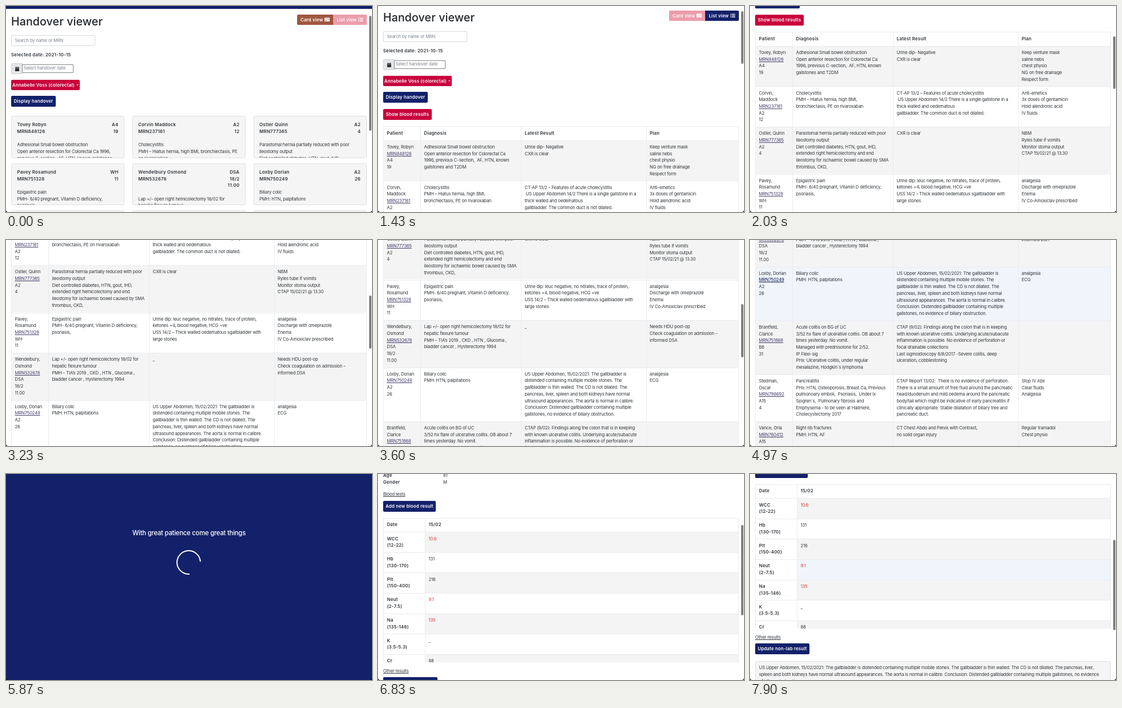
An HTML page that plays this animation: 640x360 px, repeating every 8000 ms.

```html
<!DOCTYPE html>
<html lang="en">
<head>
<meta charset="utf-8">
<title>Handover viewer</title>
<style>
html, body { margin: 0; width: 100%; height: 100%; overflow: hidden; background: #fff; }
#stage { position: relative; width: 640px; height: 360px; overflow: hidden; color: #30353a;
  font: 7.7px/11.7px Inter, "Open Sans", sans-serif; letter-spacing: -.022em; }
#stage div, p { position: absolute; box-sizing: border-box; margin: 0; }
p { white-space: pre; }
.page { left: 0; top: 0; width: 640px; height: 1400px; }
.b { font-size: 7.85px; font-weight: 600; letter-spacing: .03em; }
u { text-underline-offset: .8px; text-decoration-thickness: .6px; }
.link u { color: #453d6b; }
.title { font-size: 19.6px; line-height: 24px; font-weight: 500; letter-spacing: .005em; color: #212529; }
.hint { color: #7d858c; }
.btn { border-radius: 2px; color: #fff; font-size: 7.8px; font-weight: 600; letter-spacing: .025em;
  line-height: 18.6px; text-align: center; white-space: pre; }
.caret { display: inline-block; margin: 0 0 1.3px 3px; border: 2.3px solid transparent;
  border-top-color: #fff; border-bottom: 0; }
.card { background: #f5f5f5; border: 1px solid #e0e0e0; border-radius: 2.5px; overflow: hidden; }
.right { text-align: right; }
.line { background: #e9ebed; }
.red { color: #d9363a; }
#loader { inset: 0; background: #13216a; color: #fff; }
#loader p { left: 0; width: 640px; top: 96px; font: 500 11.3px/14px Inter, sans-serif;
  letter-spacing: -.02em; text-align: center; }
#ring { left: 298.3px; top: 132.8px; width: 43px; height: 43px; border: 2.3px solid #fff;
  border-right-color: transparent; border-radius: 50%; transform: rotate(41deg); }
#thumb { left: 635.4px; width: 3.4px; border-radius: 2px; background: #7f7f7f; }
#corners { inset: 0; border-radius: 0 0 4px 4px; box-shadow: 0 0 0 9px #000; }
</style>
</head>
<body>
<div id="stage"></div>
<script>
const NAVY = '#13216a', RED = '#c8003c', PINK = '#ec9dac', BROWN = '#a0563f';
const L = 11.7, GREY = '#f4f4f4', HOVER = '#f0f5fc';

const box = (x, y, w, h, css = '', cls = '', html = '', id = '') =>
  `<div id="${id}" class="${cls}" style="left:${x}px;top:${y}px;width:${w}px;height:${h}px;${css}">${html}</div>`;
// y is the centre of the first line
const text = (x, y, s, cls = '', css = '') =>
  `<p class="${cls}" style="left:${x}px;top:${y - L / 2}px;${css}">${s}</p>`;
const btn = (y, w, label, color = NAVY) => box(9, y, w, 18.6, 'background:' + color, 'btn', label);
const icon = (x, shape) =>
  `<svg style="position:absolute;left:${x}px;top:5.5px" width="9" height="8" fill="#fff">${shape}</svg>`;
const title = text(9, 44, 'Handover viewer', 'title');
const nav = box(0, 0, 640, 27.5, 'background:' + NAVY);

const people = [
  ['Tovey', 'Robyn', 'MRN848126', 'A4\n19'],
  ['Corvin', 'Maddock', 'MRN237161', 'A2\n12'],
  ['Ostler', 'Quinn', 'MRN777365', 'A2\n4'],
  ['Pavey', 'Rosamund', 'MRN751328', 'WH\n11'],
  ['Wendelbury', 'Osmond', 'MRN532678', 'DSA\n18/2\n11.00'],
  ['Loxby', 'Dorian', 'MRN750249', 'A2\n26'],
  ['Brantfeld', 'Clarice', 'MRN751868', 'B6\n31'],
  ['Stedman', 'Oscar', 'MRN798692', 'A15\n4'],
  ['Vance', 'Orla', 'MRN760412', 'A15\n9'],
];

const cardNotes = [
  'Adhesional Small bowel obstruction\nOpen anterior resection for Colorectal Ca 1996,\nprevious C-section,  AF, HTN, known gallstones',
  'Cholecystitis\nPMH – Hiatus hernia, high BMI, bronchiectasis, PE\non rivaroxaban',
  'Parastomal hernia partially reduced with poor\nileostomy output\nDiet controlled diabetes, HTN, gout, IHD,',
  'Epigastric pain\nPMH- 6/40 pregnant, Vitamin D deficiency,\npsoriasis,',
  'Lap +/- open right hemicolectomy 18/02 for\nhepatic flexure tumour',
  'Biliary colic\nPMH: HTN, palpitations',
  '', '', '',
];

const scan = [
  'US Upper Abdomen, 15/02/2021: The gallbladder is', 'distended containing multiple mobile stones. The',
  'gallbladder is thin walled. The CD is not dilated. The', 'pancreas, liver, spleen and both kidneys have normal',
  'ultrasound appearances. The aorta is normal in calibre.', 'Conclusion: Distended gallbladder containing multiple',
  'gallstones, no evidence of biliary obstruction.'];

const notes = [
  ['Adhesional Small bowel obstruction\nOpen anterior resection for Colorectal Ca\n1996, previous C-section,  AF, HTN, known\ngallstones and T2DM',
    'Urine dip- Negative\nCXR is clear',
    'Keep venture mask\nsaline nebs\nchest physio\nNG on free drainage\nRespect form'],
  ['Cholecystitis\nPMH – Hiatus hernia, high BMI,\nbronchiectasis, PE on rivaroxaban',
    'CT-AP 13/2 – Features of acute cholecystitis\n US Upper Abdomen 14/2 There is a single gallstone in a\nthick walled and oedematous\ngallbladder. The common duct is not dilated.',
    'Anti-emetics\n3x doses of gentamicin\nHold alendronic acid\nIV fluids'],
  ['Parastomal hernia partially reduced with poor\nileostomy output\nDiet controlled diabetes, HTN, gout, IHD,\nextended right hemicolectomy and end\nileostomy for ischaemic bowel caused by SMA\nthrombus, CKD,',
    'CXR is clear', 'NBM\nRyles tube if vomits\nMonitor stoma output\nCTAP 15/02/21 @ 13.30'],
  ['Epigastric pain\nPMH- 6/40 pregnant, Vitamin D deficiency,\npsoriasis,',
    'Urine dip: leuc negative, no nitrates, trace of protein,\nketones +4, blood negative, HCG +ve\nUSS 14/2 – Thick walled oedematous sgallbladder with\nlarge stones',
    'analgesia\nDischarge with omeprazole\nEnema\nIV Co-Amoxiclav prescribed'],
  ['Lap +/- open right hemicolectomy 18/02 for\nhepatic flexure tumour\nPMH – TIA’s 2019 , CKD , HTN , Glucoma ,\nbladder cancer , Hysterectomy 1994',
    '_', 'Needs HDU post-op\nCheck coagulation on admission –\ninformed DSA'],
  ['Biliary colic\nPMH: HTN, palpitations', scan.join('\n'), 'analgesia\nECG'],
  ['Acute colitis on BG of UC\n3/52 hx flare of ulcerative colitis. OB about 7\ntimes yesterday. No vomit.\nManaged with prednisolone for 2/52.\nIP Flexi-sig\nPHx: Ulcerative colitis, under regular\nmesalazine, Hodgkin`s lymphoma',
    'CTAP (9/02): Findings along the colon that is in keeping\nwith known ulcerative colitis. Underlying acute/subacute\ninflammation is possible. No evidence of perforation or\nfocal drainable collections\nLast sigmoidoscopy 8/8/2017 -Severe colitis, deep\nulceration, cobblestoning', ''],
  ['Pancreatitis\nPHx: HTN, Osteoporosis, Breast Ca, Previous\npulmonoary emboli,  Psoriasis,  Under Ix\nSjogren`s,  Pulmonary fibrosis and\nEmphysema - to be seen at Hallmere,\nCholecystectomy 2017',
    'CTAP Report 13/02:  There is no evidence of perforation.\nThere is a small amount of free fluid around the pancreatic\nhead/duodenum and mild oedema around the pancreatic\nbody/tail which might be indicative of early pancreatitis if\nclinically appropriate. Stable dilatation of biliary tree and\npancreatic duct.',
    'Stop IV Abx\nClear fluids\nAnalgesia'],
  ['Right rib fractures\nPMH: HTN, AF', 'CT Chest Abdo and Pelvis with Contrast,\nno solid organ injury', 'Regular tramadol\nChest physio'],
];

function cards() {
  return people.map(([last, first, mrn, ward], i) => {
    const gap = ward.split('\n').length + 1;
    return box(9 + i % 3 * 211.8, 215 + Math.floor(i / 3) * 82.7, 198, 73.6, '', 'card',
      text(9.5, 15, `${last} ${first}\n${mrn}`, 'b') +
      text(0, 15, ward, 'b right', 'left:auto;right:9.5px') +
      text(9.5, 15 + gap * L, cardNotes[i]));
  }).join('');
}

const vline = (x, y, h) => box(x, y, 1, h, '', 'line');
const hline = (x, y) => box(x, y, 621.5, 1, '', 'line');

function list() {
  const cols = [9, 74, 250, 468.5, 630];
  const head = ['Patient', 'Diagnosis', 'Latest Result', 'Plan'];
  const top = 240.3;
  let y = top + 24.4;
  let html = head.map((h, i) => text(cols[i] + 6.5, top + 12.2, h, 'b')).join('') + hline(9, top);
  people.forEach(([last, first, mrn, ward], i) => {
    const gap = (last + first).length < 12 ? ' ' : '\n';
    const cells = [`${last},${gap}${first}\n<u>${mrn}</u>\n${ward}`, ...notes[i]];
    const h = Math.max(...cells.map(c => c.split('\n').length)) * L + 12.2;
    const hit = mrn == 'MRN750249';
    html += box(9, y, 621.5, h, i % 2 ? '' : 'background:' + GREY, '', '', hit ? 'hit' : '') + hline(9, y) +
      cells.map((c, k) => text(cols[k] + 6.5, y + 12, c, k ? '' : 'link' + (hit ? ' hitLink' : ''))).join('');
    y += h;
  });
  return html + hline(9, y) + cols.map(x => vline(x, top, y - top)).join('') + btn(210.3, 85, 'Show blood results', RED);
}

function home() {
  return nav + title +
    box(508.5, 37.5, 63.5, 18.6, 'border-radius:2px 0 0 2px;text-align:left;padding-left:6.5px', 'btn', 'Card view' +
      icon(48.5, '<path fill-rule="evenodd" d="M.8.5h7.4q.8 0 .8.8v5q0 .7-.8.7H.8Q0 7 0 6.3v-5Q0 .5.8.5zM1.3 5.7h2.8Q4 4.2 2.7 4.2T1.3 5.7zM2 3h1.4V1.8H2zM5.2 2.2v.7h2.5v-.7zm0 1.6v.7h2.5v-.7z"/>'), 'cardBtn') +
    box(572, 37.5, 58.5, 18.6, 'border-radius:0 2px 2px 0;text-align:left;padding-left:6.5px', 'btn', 'List view' +
      icon(44, '<path d="M0 .7h1.5v1.3H0zm2.5 0h6v1.2h-6zM0 3.2h1.5v1.3H0zm2.5 0h6v1.2h-6zM0 5.7h1.5V7H0zm2.5 0h6v1.2h-6z"/>'), 'listBtn') +
    box(9, 74.3, 147, 19, 'border:1px solid #d5d9dd;border-radius:2px') + text(15.5, 84.3, 'Search by name or MRN', 'hint') +
    text(9, 109, 'Selected date: 2021-10-15', 'b') +
    box(9, 122.5, 20, 19.3, 'background:#e4e6e9;border:1px solid #ced4da;border-radius:2px 0 0 2px', '',
      '<svg style="position:absolute;left:6px;top:5px" width="8" height="8" fill="#333"><path d="M1.5 0h1v1h2V0h1v1H7v1.5H0V1h1.5zM0 3h7v5H0z"/></svg>') +
    box(28, 125, 90, 14.5, 'border:1px solid #858585;border-radius:1px') + text(30.7, 132.3, 'Select handover date', 'hint') +
    btn(151.5, 120, 'Annabelle Voss (colorectal)<span class="caret"></span>', RED) +
    btn(180, 78, 'Display handover') +
    `<section id="cards">${cards()}</section><section id="list">${list()}</section>`;
}

function bloods() {
  const info = [['Name', 'Loxby Dorian'], ['MRN', 'MRN750249'], ['Age', '81'], ['Gender', 'M']];
  const tests = [['WCC', '12-22', '10.6', 1], ['Hb', '130-170', '131'], ['Plt', '150-400', '216'],
    ['Neut', '2-7.5', '9.1', 1], ['Na', '135-146', '135', 1], ['K', '3.5-5.3', '_'], ['Cr', '59-104', '88']];
  const rows = tests.map(([name, range, value, odd], i) => {
    const y = 24.2 + i * 35.6;
    return box(73, y, 548, 35.6, i % 2 ? '' : 'background:' + GREY, '', '', name == 'Neut' ? 'neut' : '') +
      hline(0, y) + text(6.7, y + 12.2, `${name}\n(${range})`, 'b') +
      text(79.5, y + 12.2, value, odd ? 'red' : '');
  }).join('');
  const table = hline(0, 0) + text(6.7, 12.2, 'Date', 'b') + text(79.5, 12.2, '15/02', 'b') + rows +
    [0, 73, 620.5].map(x => vline(x, 0, 300)).join('');
  const report = scan.join(' ').replace('liver, ', 'liver,\n').replace('evidence ', 'evidence\n');
  return nav + title +
    info.map(([k, v], i) => text(9, 177.8 + i * L, k, 'b') + text(114, 177.8 + i * L, v)).join('') +
    text(9, 234, '<u>Blood tests</u>') + btn(245, 92, 'Add new blood result') +
    box(9, 275, 621.5, 252, 'overflow:hidden', '', table) +
    text(9, 543, '<u>Other results</u>') + btn(553.3, 95, 'Update non-lab result') +
    box(9, 583.5, 621.5, 48, '', 'card', text(5.7, 11.5, report));
}

const $ = id => document.getElementById(id);
$('stage').innerHTML = `<div id="home" class="page">${home()}</div><div id="bloods" class="page">${bloods()}</div>
  <div id="thumb"></div><div id="loader"><p>With great patience come great things</p><div id="ring"></div></div><div id="corners"></div>`;

// start, end, scroll from, scroll to
const moves = [[970, 1430, 23, 30], [1530, 2150, 30, 196], [3000, 3630, 196, 419], [3770, 4200, 419, 595],
  [6100, 6101, 0, 0], [6700, 6900, 0, 207], [7630, 7900, 207, 257]];
const pauses = [[3230, 70], [3970, 100], [6830, 40]];
// scrollbar: appears, starts to fade, gone
const bars = [[0, 30, 330], [970, 2170, 2400], [3000, 4470, 4700], [6100, 6230, 6430], [6700, 7050, 7230], [7630, 8000, 8100]];

const ramp = (t, a, b) => Math.min(1, Math.max(0, (t - a) / (b - a)));
const mix = (a, b, k) => `color-mix(in srgb, ${b} ${k * 100}%, ${a})`;
const show = (id, on) => $(id).style.display = on ? '' : 'none';
const rowFill = (id, on, rest) => $(id).style.background = on ? HOVER : rest;

function draw(t) {
  for (const [at, d] of pauses) if (t >= at && t < at + d) t = at;
  let y = 23;
  for (const [a, b, from, to] of moves)
    if (t >= a) y = from + (to - from) * (1 - (1 - ramp(t, a, b)) ** 3);
  const inList = t >= 700, inBloods = t >= 6100;
  show('home', !inBloods);
  show('bloods', inBloods);
  show('cards', !inList);
  show('list', inList);
  show('loader', t >= 5870 && !inBloods);
  $('home').style.transform = $('bloods').style.transform = `translateY(${-y}px)`;

  $('cardBtn').style.background = inList ? mix(NAVY, PINK, ramp(t, 690, 800)) : mix(BROWN, NAVY, ramp(t, 30, 200));
  $('listBtn').style.background = t < 970 ? mix(PINK, BROWN, ramp(t, 30, 200)) : mix(BROWN, NAVY, ramp(t, 970, 1120));
  rowFill('hit', t >= 3770, '');
  rowFill('neut', t >= 7700, '');
  document.querySelector('.hitLink u').style.color = t >= 4970 ? '#0a1550' : '';

  const [top, len] = inBloods ? [2 + .44 * y, 158] : inList ? [.5 + .267 * y, 92.5] : [17, 201];
  const bar = bars.findLast(b => t >= b[0]);
  Object.assign($('thumb').style, { top: top + 'px', height: len + 'px', opacity: 1 - ramp(t, bar[1], bar[2]) });
}

function tick() {
  draw(performance.now() % 8000);
  requestAnimationFrame(tick);
}
tick();
</script>
</body>
</html>
```
